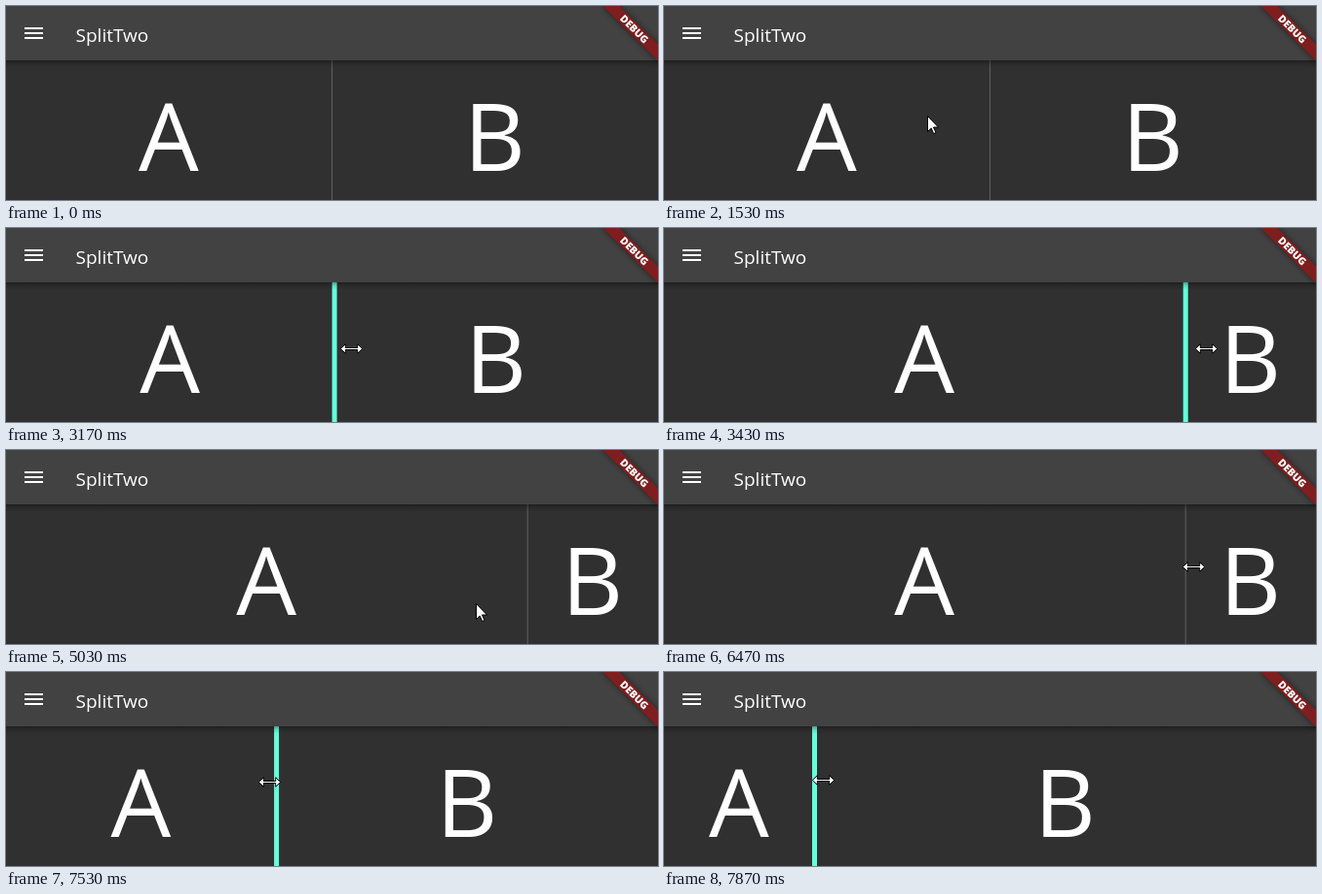
Recreate the animation shown at these times as an HTML page. Size 669 px wide and 200 px high, loop 8 s.

```html
<!DOCTYPE html>
<html lang="en">
<head>
<meta charset="utf-8">
<title>SplitTwo</title>
<style>
  html, body { margin: 0; width: 100%; height: 100%; overflow: hidden; background: #303030; }
  svg { display: block; width: 669px; height: 200px; }
  text { font-family: "Open Sans", "Noto Sans", sans-serif; fill: #fff; }
  .letter { font-size: 97.5px; text-anchor: middle; }
  .cursor { fill: #fff; stroke: #000; stroke-width: 1; }
</style>
</head>
<body>
<svg viewBox="0 0 669 200">
  <defs>
    <linearGradient id="fade" x2="0" y2="1">
      <stop offset="0" stop-opacity=".36"/>
      <stop offset=".4" stop-opacity=".15"/>
      <stop offset="1" stop-opacity="0"/>
    </linearGradient>
    <filter id="blur" x="-20%" y="-100%" width="140%" height="300%">
      <feGaussianBlur stdDeviation="3"/>
    </filter>
  </defs>

  <rect width="669" height="200" fill="#303030"/>
  <text id="a" class="letter" y="170">A</text>
  <text id="b" class="letter" y="170">B</text>
  <rect id="bar" y="56" height="144"/>

  <rect y="56" width="669" height="8" fill="url(#fade)"/>
  <rect width="669" height="56" fill="#424242"/>
  <path d="M19 22h19v2h-19zM19 27h19v2h-19zM19 32h19v2h-19z" fill="#fff"/>
  <text x="71.5" y="37" font-size="19" font-weight="500">SplitTwo</text>

  <g transform="translate(669) rotate(45)">
    <rect x="-40" y="28" width="80" height="12" opacity=".5" filter="url(#blur)"/>
    <rect x="-40" y="28" width="80" height="12" fill="#7f1e1e"/>
    <text x="-.5" y="37.7" font-size="10.5" font-weight="800" text-anchor="middle">DEBUG</text>
  </g>

  <path id="arrow" class="cursor" d="M.5 .5V16.5L4.2 13L6.7 18.6L9 17.6L6.5 12H11.5Z"/>
  <path id="resize" class="cursor" d="M-11.2 0l5-4.8v3.8h12.4v-3.8l5 4.8-5 4.8v-3.8h-12.4v3.8z"/>
</svg>
<script>
const LOOP = 8000, TICK = 100 / 3, WIDTH = 669;
const GRAB = 9, LAG = 0.6;   // pointer offset from the divider, delay in ticks

// Pointer moves: ticks, slowness of the start, Bézier points
const ENTER = [120, 200], IDLE = [263, 123], LEFT_GRIP = [343.5, 124],
  DROP = [582, 125], TURN = [520, 125], RIGHT_GRIP = [543.5, 120.5], END = [163.5, 111];
const moves = [
  { from: 14, to: 26, slow: 1, points: [ENTER, [220, 85], IDLE] },
  { from: 45, to: 70, slow: 1, points: [IDLE, [290, 72], LEFT_GRIP] },
  { from: 94, to: 107.5, slow: 1.6, points: [LEFT_GRIP, DROP] },
  { from: 135, to: 160, slow: 2.5, points: [DROP, [545, 240], [418, 149], TURN] },
  { from: 160, to: 167, slow: 1, points: [TURN, RIGHT_GRIP] },
  { from: 214, to: 235, slow: 1.9, points: [RIGHT_GRIP, END] }
];

const $ = id => document.getElementById(id);
const set = (id, attrs) => {
  for (const k in attrs) $(id).setAttribute(k, attrs[k]);
};
const show = (id, on) => set(id, { visibility: on ? "visible" : "hidden" });
const within = (n, from, to) => n >= from && n < to;
const mix = (p, q, u) => p.map((v, i) => v + (q[i] - v) * u);
const ease = (f, slow) => 1 - (1 - f ** slow) ** 3;

function bezier(points, u) {
  if (points.length === 1) return points[0];
  return bezier(points.slice(1).map((q, i) => mix(points[i], q, u)), u);
}

function pointer(n) {
  const move = moves.findLast(m => n >= m.from) || moves[0];
  const f = (n - move.from) / (move.to - move.from);
  return bezier(move.points, ease(Math.min(Math.max(f, 0), 1), move.slow));
}

function divider(n) {
  if (n < 95) return WIDTH / 2;
  const x = within(n, 109, 215) ? WIDTH : pointer(n - LAG)[0] - GRAB;
  return Math.min(x, WIDTH * 0.8);
}

function draw(now) {
  const n = Math.floor((now % LOOP + 4) / TICK);
  const c = divider(n), [x, y] = pointer(n);
  const active = within(n, 82, 123) || n >= 205;
  const sizing = within(n, 69, 124) || n >= 194;
  const w = active ? 5 : 1;

  set("a", { x: c / 2 - 0.5 });
  set("b", { x: (c + WIDTH) / 2 - 0.5 });
  set("bar", { x: c - w / 2, width: w, fill: active ? "#64ffda" : "#606060" });
  set("arrow", { transform: `translate(${Math.round(x)} ${Math.round(y)})` });
  set("resize", { transform: `translate(${Math.floor(x) + 0.5} ${Math.floor(y) + 0.5})` });
  show("arrow", n >= 15 && !sizing);
  show("resize", sizing);
}

const start = performance.now();
(function frame() {
  draw(performance.now() - start);
  requestAnimationFrame(frame);
})();
</script>
</body>
</html>
```
